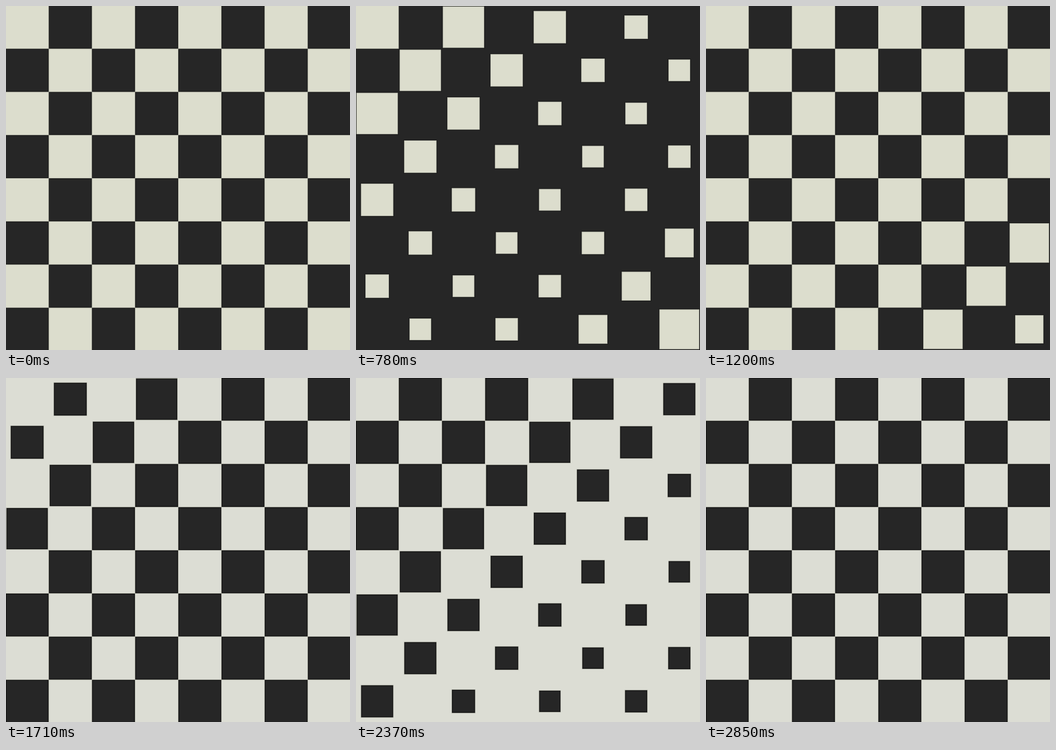
An HTML page with a canvas that plays this animation: 748x748 px, repeating every 2.88 s.

```html
<!DOCTYPE html>
<html>
<head>
<meta charset="utf-8">
<style>
html, body { margin: 0; width: 100%; height: 100%; overflow: hidden; background: #262626; }
canvas { display: block; }
</style>
</head>
<body>
<canvas id="board" width="748" height="748"></canvas>
<script>
const ctx = document.getElementById('board').getContext('2d');
const LOOP = 2880, HALF = LOOP / 2, STEP = 30;
const CELL = 93.86, FIRST = 46;
const DELAY = 45, SHRINK_AT = 12, GROW_AT = 398, DURATION = 405;
const DARK = '#262626', EDGE = '#0e0e0e', RIM = '#84857c';

function ease(time) {
  const x = Math.max(0, Math.min(1, time / DURATION));
  return x < 0.5 ? 4 * x ** 3 : 1 - 4 * (1 - x) ** 3;
}

// Shrinks to half size, then grows back
const size = p => CELL * (1 - 0.5 * (ease(p - SHRINK_AT) - ease(p - GROW_AT)));

function squares(parity, time, extra, color) {
  ctx.fillStyle = color;
  for (let row = 0; row < 8; row++) {
    for (let col = 0; col < 8; col++) {
      const diag = row + col;
      if (diag % 2 !== parity) continue;
      const s = size(time - diag * DELAY) + extra;
      ctx.fillRect(FIRST + col * CELL - s / 2, FIRST + row * CELL - s / 2, s, s);
    }
  }
}

function draw(t) {
  const lightMoves = t < HALF;
  const light = lightMoves ? '#dcddcd' : '#dcddd4';
  ctx.fillStyle = lightMoves ? DARK : light;
  ctx.fillRect(0, 0, 748, 748);
  const layers = lightMoves
    ? [[3, EDGE], [1, RIM], [-1, light]]
    : [[0.6, RIM], [-1.2, EDGE], [-4, DARK]];
  const time = lightMoves ? t : t - HALF - 15;
  for (const [extra, color] of layers) squares(lightMoves ? 0 : 1, time, extra, color);
}

const start = performance.now();
function tick() {
  const t = (performance.now() - start) % LOOP;
  draw(Math.floor(t / STEP) * STEP);
  requestAnimationFrame(tick);
}
tick();
</script>
</body>
</html>
```
